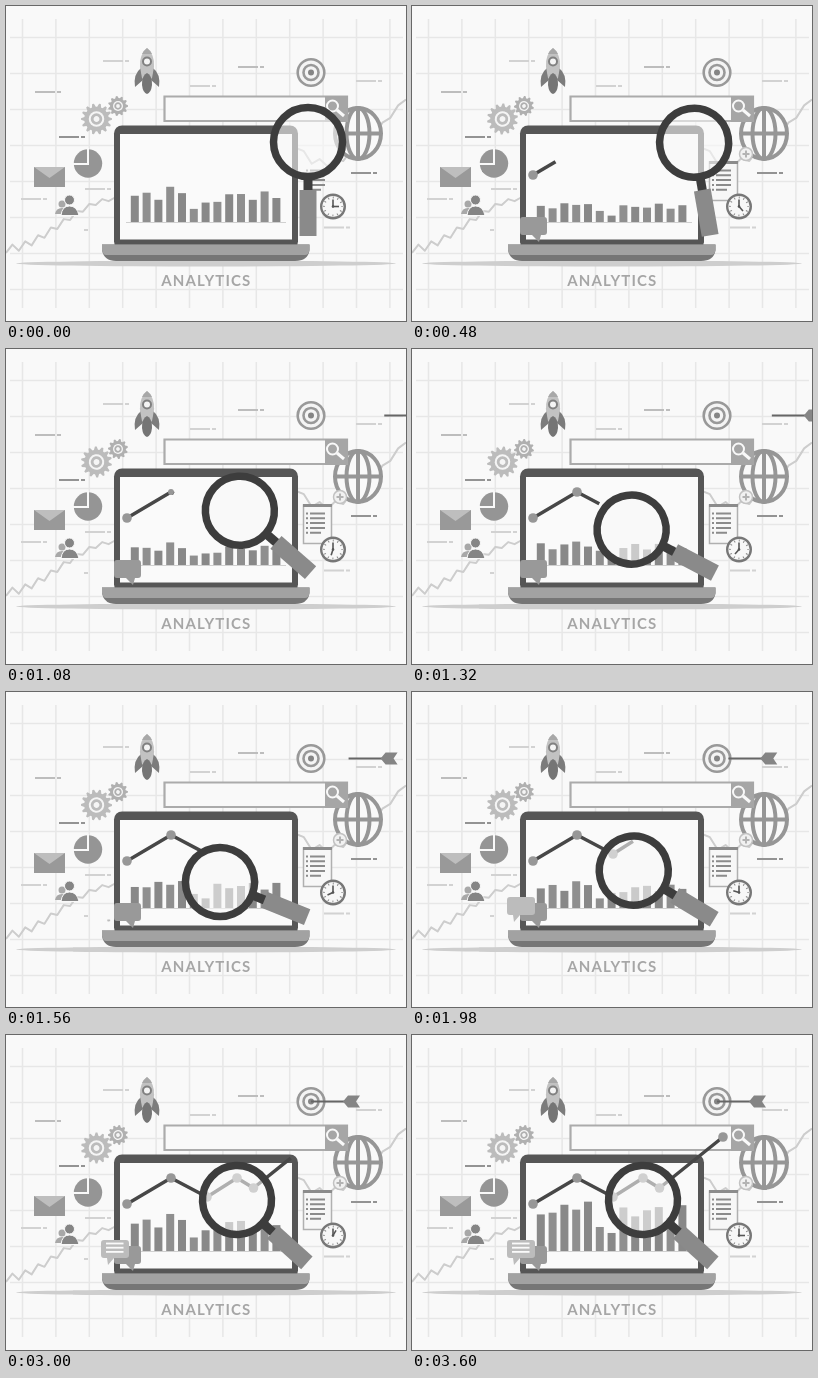
Animation, 400 px wide and 315 px high, one loop 4500 ms. Source, as an HTML page:

```html
<!DOCTYPE html>
<html lang="en">
<head>
<meta charset="utf-8">
<title>Analytics</title>
<style>
html, body { margin: 0; width: 100%; height: 100%; overflow: hidden; background: #f9f9f9; }
svg { display: block; width: 100vw; height: 100vh; }
text { font: bold 15px Lato, "Open Sans", sans-serif; letter-spacing: 1.1px; fill: #a6a6a6; }
.line { fill: none; stroke-linejoin: round; }
</style>
</head>
<body>
<svg viewBox="0 0 400 315">
  <defs><path id="dash" d="M0 0h20m2 0h4" stroke-width="2"/></defs>
  <g id="grid" stroke="#e7e7e7" stroke-width="1.5"></g>
  <g id="ridges" class="line" stroke="#cdcdcd" stroke-width="2"></g>
  <g stroke="#d2d2d2">
    <use href="#dash" x="97" y="55"/><use href="#dash" x="79" y="183"/>
    <use href="#dash" x="15" y="193"/><use href="#dash" x="184" y="80"/>
    <use href="#dash" x="350" y="75"/><use href="#dash" x="318" y="221.5"/>
    <path d="M78 224h4" stroke-width="2"/>
  </g>
  <g stroke="#bdbdbd"><use href="#dash" x="29" y="86"/><use href="#dash" x="232" y="61"/></g>
  <g stroke="#939393"><use href="#dash" x="53" y="131"/><use href="#dash" x="345" y="167"/></g>

  <g id="rocket">
    <path d="M135 62Q127 68 129 81L137 74ZM147 62Q155 68 153 81L145 74Z" fill="#7c7c7c"/>
    <path d="M141 42Q149 49 148 61L146 72H136L134 61Q133 49 141 42Z" fill="#c2c2c2"/>
    <path d="M141 42Q144 44 146 48H136Q138 44 141 42Z" fill="#a8a8a8"/>
    <circle cx="141" cy="55.500" r="4" fill="#f4f4f4" stroke="#808080" stroke-width="2"/>
    <path d="M141 67Q146 69 146 79Q145 87 141 88Q137 87 136 79Q136 69 141 67Z" fill="#757575"/>
  </g>

  <g id="bigGear"></g>
  <g id="smallGear"></g>

  <circle cx="82" cy="157.500" r="14.200" fill="#959595"/>
  <path d="M82 142V158H66" fill="none" stroke="#f9f9f9" stroke-width="2"/>
  <path d="M28 161H59V181H28Z" fill="#999"/>
  <path d="M28 161H59L43.500 172Z" fill="#bebebe"/>
  <g fill="#a8a8a8"><circle cx="56" cy="198" r="3.500"/><path d="M49 208Q50 202 56 202 62 202 63 208Z"/></g>
  <g fill="#858585" stroke="#f9f9f9"><circle cx="63.500" cy="194" r="5"/><path d="M55 209.500Q56 200 63.500 200 71 200 73 209.500Z"/></g>

  <g class="line" stroke="#969696" stroke-width="4">
    <ellipse cx="352" cy="127.500" rx="23" ry="25.500" fill="#f9f9f9"/>
    <ellipse cx="352" cy="127.500" rx="11.500" ry="25.500"/>
    <path d="M352 102V153M328 127.500H376"/>
  </g>

  <path d="M158.500 90.500H341V115H158.500Z" fill="#f9f9f9" stroke="#ababab" stroke-width="2.200"/>
  <path d="M319 90H342V116H319Z" fill="#a6a6a6"/>
  <g class="line" stroke="#f9f9f9" stroke-width="2">
    <circle cx="326.500" cy="100" r="5.500"/><path d="M331 104L338 110" stroke-width="3"/>
  </g>

  <g class="line" stroke="#999" stroke-width="2.600">
    <circle cx="305" cy="66.500" r="13.300" fill="#f4f4f4"/><circle cx="305" cy="66.500" r="7.500"/>
    <circle cx="305" cy="66.500" r="3" fill="#858585" stroke="none"/>
  </g>
  <g id="arrow">
    <path d="M0 0H38" stroke="#666" stroke-width="2"/>
    <path d="M32 0L37 -6H49L45 0 49 6H37Z" fill="#858585"/>
  </g>

  <g id="page">
    <path d="M297.500 156H325.500V194.500H297.500Z" fill="#f7f7f7" stroke="#b0b0b0" stroke-width="1.500"/>
    <path d="M297 156.500H326" stroke="#8c8c8c" stroke-width="3"/>
  </g>
  <g id="rows" stroke="#8b8b8b" stroke-width="2"></g>
  <g id="plus">
    <circle r="6.500" fill="#f1f1f1" stroke="#c2c2c2" stroke-width="1.500"/>
    <path d="M-3.500 0H3.500M0 -3.500V3.500" stroke="#b3b3b3" stroke-width="2"/>
  </g>

  <g transform="translate(327 200.500)">
    <circle r="11.800" fill="#f7f7f7" stroke="#777" stroke-width="2.400"/>
    <circle r="9" fill="none" stroke="#888" stroke-width="2" stroke-dasharray="1 3.712" stroke-dashoffset=".5"/>
    <path d="M0 0V-7" stroke="#555" stroke-width="1.600"/>
    <path id="hand" d="M0 1V-6" stroke="#555" stroke-width="1.600"/>
    <circle r="1.300" fill="#555"/>
  </g>

  <ellipse cx="200" cy="257.500" rx="190" ry="3" fill="#cecece"/>
  <rect x="108" y="119.500" width="184" height="124" rx="8" fill="#565656"/>
  <path d="M114 128H286V233.500H114Z" fill="#fafafa"/>
  <path d="M96 238.500H303.500V244Q302 255 289 255H110Q98 255 96 244Z" fill="#767676"/>
  <path d="M96 238.500H303.500V244Q303 249 299 249H100Q97 249 96 244Z" fill="#a2a2a2"/>
  <path d="M120 216.500H280" stroke="#d0d0d0"/>
  <g id="bars"></g>

  <g id="bubble">
    <path d="M111 211H132Q135 211 135 214V226Q135 229 132 229H129L127 236 120 229H111Q108 229 108 226V214Q108 211 111 211Z" fill="#999"/>
  </g>
  <g id="reply">
    <path d="M98 205H120Q123 205 123 208V220Q123 223 120 223H108L102 230 101 223H98Q95 223 95 220V208Q95 205 98 205Z" fill="#bcbcbc"/>
    <g id="words" stroke="#fafafa" stroke-width="1.800"></g>
  </g>

  <path id="trend" class="line" stroke="#474747" stroke-width="3.500"/>
  <g id="nodes" fill="#979797"></g>

  <g id="glass">
    <path d="M35 0H50" stroke="#3d3d3d" stroke-width="9"/>
    <path d="M48 -8.500H94V8.500H48Z" fill="#8a8a8a"/>
    <circle r="34.500" fill="#fafafa" fill-opacity=".58" stroke="#3d3d3d" stroke-width="7.500"/>
  </g>
  <text x="200.300" y="279.800" text-anchor="middle">ANALYTICS</text>
</svg>
<script>
const LOOP = 4500, STEP = 60, END = 3600;
const $ = id => document.getElementById(id);

function add(parent, tag, attrs) {
  const el = document.createElementNS("http://www.w3.org/2000/svg", tag);
  for (const k in attrs) el.setAttribute(k, attrs[k]);
  return $(parent).appendChild(el);
}
const range = n => [...Array(n).keys()];
const put = (id, transform) => $(id).setAttribute("transform", transform);
const ramp = (t, a, b) => Math.min(1, Math.max(0, (t - a) / (b - a)));
const smooth = p => p * p * (3 - 2 * p);
const slow = (p, k) => 1 - (1 - p) ** k;
const mix = (a, b, p) => a + (b - a) * p;
const bump = (x, width) => Math.exp(-x * x / width);

// Static parts
for (const i of range(12)) add("grid", "path", { d: `M${16.5 + i * 33.4} 13V302` });
for (const i of range(8)) add("grid", "path", { d: `M4 ${31.5 + i * 36}H397` });
for (const i of range(5)) add("rows", "path", { d: `M300 ${164.5 + i * 4.8}h2m2 0h${i === 4 ? 11 : 15}` });

// Jagged curve: a smooth slope with a fading zigzag
function ridge(x0, x1, n, slope) {
  const pts = range(n + 1).map(i => {
    const p = i / n, jag = (i % 2 ? -1 : 1) * (4 - 2.5 * p);
    return [mix(x0, x1, p), slope(p) + jag];
  });
  add("ridges", "path", { d: "M" + pts.join("L") });
}
ridge(0, 109, 17, p => 243 - 50 * smooth(p));
ridge(290, 400, 14, p => mix(138, 92, p) + 34 * Math.sin(Math.PI * p ** 0.75));

function gear(id, r, teeth, color) {
  const pts = range(teeth * 4).map(i => {
    const a = (i - 0.5) / (teeth * 2) * Math.PI;
    const k = i % 4 < 2 ? r : r * 0.79;
    return [k * Math.cos(a), k * Math.sin(a)].map(v => v.toFixed(2));
  });
  add(id, "path", { d: `M${pts.join("L")}Z`, fill: color });
  add(id, "circle", { r: r * 0.5, fill: "#f5f5f5" });
  add(id, "circle", { r: r * 0.28, fill: "none", stroke: color, "stroke-width": r * 0.18 });
}
gear("bigGear", 15.5, 14, "#bcbcbc");
gear("smallGear", 10, 11, "#b0b0b0");

const bars = range(13).map(i =>
  add("bars", "rect", { x: 124.8 + i * 11.8, width: 8, fill: i % 2 ? "#8f8f8f" : "#888" }));

// Bars share a level that sinks, swells and finally rises; each one also sways
function barHeight(i, t) {
  const level = 25 - 10 * smooth(ramp(t, 0, 480)) + 7 * bump(t - 1700, 160000)
    + 23 * smooth(ramp(t, 2400, END));
  const shape = 1.05 - 0.55 * bump(i - 5.5, 1.2) + 0.3 * bump(i - 3.5, 0.8);
  return level * (shape + 0.18 * Math.sin(i * 2.4 + t / 160));
}

// Each vertex has the time at which its node pops
const points = [[121, 169, 100], [165, 143, 970], [201, 162, 1620],
  [231, 143, 2240], [247.5, 153, 2680], [311, 102, 3300]];
const nodes = points.map(([cx, cy]) => add("nodes", "circle", { cx, cy }));
const words = range(3).map(() => add("words", "path", {}));

function drawTrend(t) {
  let d = "";
  points.forEach(([x, y, time], i) => {
    nodes[i].setAttribute("r", 4.8 * ramp(t, time, time + 180));
    const next = points[i + 1];
    if (!next || t <= time + 80) return;
    const p = slow(ramp(t, time + 80, next[2]), 1.5);
    d += `${i ? "" : `M${x} ${y}`}L${mix(x, next[0], p)} ${mix(y, next[1], p)}`;
  });
  $("trend").setAttribute("d", d);
}

function drawGlass(t) {
  const p = smooth(ramp(t, 0, 1560)), q = smooth(ramp(t, 1740, 2250));
  const x = mix(302, 214, p) + 17 * q;
  const y = mix(136, 190, p ** 2.9) - 25 * q;
  const a = mix(90, 22, p ** 1.3) + 20 * q;
  put("glass", `translate(${x} ${y}) rotate(${a})`);
}

function grow(id, x, y, s) {
  put(id, `translate(${x} ${y}) scale(${s}) translate(${-x} ${-y})`);
}

function draw(t) {
  bars.forEach((el, i) => {
    const h = barHeight(i, t);
    el.setAttribute("y", 216 - h);
    el.setAttribute("height", h);
  });
  drawTrend(t);
  drawGlass(t);

  const turn = 90 * ramp(t, 0, 2700);
  put("bigGear", `translate(90.5 113) rotate(${turn})`);
  put("smallGear", `translate(112 100) rotate(${-turn * 14 / 11})`);
  put("hand", `rotate(${90 + t / 10})`);

  const tip = mix(401, 305, slow(ramp(t, 800, 2240), 1.25));
  const wobble = t < 2240 ? 0 : 11 * Math.sin((t - 2240) / 48) * (1 - ramp(t, 2240, 2720));
  put("arrow", `translate(${tip} 66.4) rotate(${-wobble})`);

  $("page").setAttribute("opacity", ramp(t, 0, 300));
  put("plus", `translate(334 148) scale(${smooth(ramp(t, 120, 420))})`);
  grow("bubble", 127, 236, smooth(ramp(t, 120, 420)));
  grow("reply", 102, 230, smooth(ramp(t, 1470, 1920)));
  words.forEach((el, i) => {
    const w = 17.5 * ramp(t, 2100 + i * 260, 2360 + i * 260);
    el.setAttribute("d", w ? `M100 ${208.5 + i * 4.2}h${w}` : "");
  });
}

const start = performance.now();
function tick() {
  const t = (performance.now() - start) % LOOP;
  draw(Math.min(END, Math.floor(t / STEP) * STEP));
  requestAnimationFrame(tick);
}
tick();
</script>
</body>
</html>
```
